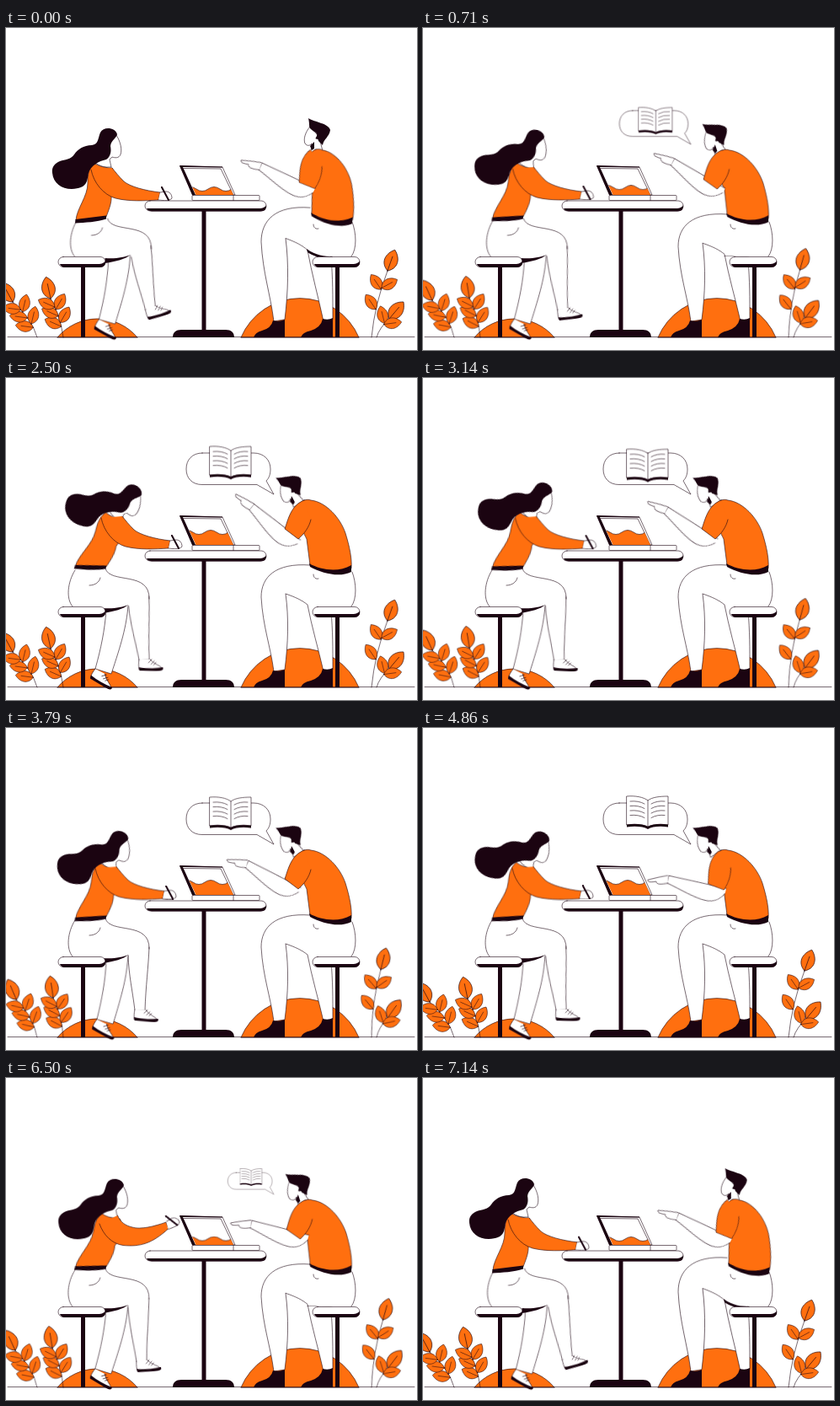
Recreate the animation shown at these times as an HTML page. Size 488 by 382 pixels, loop 7.21 s.

```html
<!DOCTYPE html>
<html lang="en">
<head>
<meta charset="utf-8">
<title>Two people talking at a table</title>
<style>
html, body { margin: 0; width: 100%; height: 100%; overflow: hidden; background: #fff; }
svg { display: block; width: 488px; height: 382px; --dark: #1b0411; --orange: #ff6f0f; }
path, rect { stroke: var(--dark); stroke-width: .6; fill: #fff; stroke-linejoin: round; stroke-linecap: round; }
.dark { fill: var(--dark); stroke: none; }
.orange { fill: var(--orange); }
.line { fill: none; }

/* Every moving part turns about its own joint, set as transform-origin */
.move { animation: 7.21s ease-in-out infinite; }
.sway { animation: sway 1201.667ms ease-in-out infinite alternate; }
@keyframes sway { to { transform: rotate(var(--turn)); } }
#book { animation: float 1201.667ms -1601.667ms ease-in-out infinite alternate; }
@keyframes float { from { transform: translateY(2.5px); } to { transform: translateY(-2.5px); } }
#bubble { animation-name: bubble; transform-origin: 318px 138px; }
@keyframes bubble { 0%, 6%, 93%, 100% { transform: scale(0); } 11.5%, 87.5% { transform: none; } }
#wave { animation-name: wave; }
@keyframes wave {
  0%, 100% { transform: translateY(4px); }
  20.8% { transform: none; }
  34.7%, 67.4% { transform: translate(-4px, -4px); }
  80.3% { transform: translateY(3px); }
}

/* woman */
#w-head { animation-name: w-head; transform-origin: 118px 160px; }
@keyframes w-head {
  20.8% { transform: translate(16px, 2px) rotate(18.5deg); }
  34.7% { transform: translate(15.5px, 3px) rotate(26deg); }
  52.6% { transform: translate(7px, 2px) rotate(11deg); }
  67.4% { transform: translate(7.5px, 1px) rotate(19.5deg); }
  80.3% { transform: translate(15px, 1.5px) rotate(1.5deg); }
}
#w-torso { animation-name: w-torso; transform-origin: 119px 224px; }
@keyframes w-torso {
  20.8%, 34.7% { transform: rotate(8deg) skewX(-5deg); }
  52.6%, 67.4% { transform: rotate(3.5deg) skewX(-2.5deg); }
  80.3% { transform: rotate(12deg) skewX(-7deg); }
}
#w-arm { animation-name: w-arm; }
@keyframes w-arm {
  20.8%, 34.7%, 80.3% { transform: translate(12px, -2px); }
  52.6%, 67.4% { transform: translate(5px, -1.5px); }
}
#w-sleeve { animation-name: w-sleeve; }
@keyframes w-sleeve {
  0%, 67.4%, 100% { d: path("M101 168C104 184 116 198 130 202C146 206 165 205 181 204L183 195C165 193 147 188 140 182C134 176 130 171 126 166"); }
  80.3% { d: path("M109 180C116 192 124 197 136 197C160 197 170 190 193 155L185 149C175 161 160 174 148 174C138 176 130 174 127 162"); }
}
#w-hand { animation-name: w-hand; transform-origin: 182px 199.5px; }
@keyframes w-hand {
  0%, 67.4% { transform: none; }
  80.3% { transform: translate(7px, -47.5px) rotate(-48deg); }
}
#w-hips { animation-name: w-hips; }
@keyframes w-hips {
  0%, 100% { transform: translateX(2.5px); }
  20.8%, 67.4% { transform: none; }
  80.3% { transform: translateX(-3px); }
}
#w-far-shin { animation-name: w-far-shin; transform-origin: 158px 262px; }
@keyframes w-far-shin {
  0%, 100% { transform: rotate(-8deg); }
  20.8%, 52.6% { transform: none; }
  34.7%, 67.4% { transform: rotate(-4deg); }
  80.3% { transform: translateY(4px) rotate(4.5deg); }
}
#w-far-foot { animation-name: w-far-foot; transform-origin: 153px 334px; }
@keyframes w-far-foot { 0%, 100% { transform: rotate(-13deg); } 20.8%, 80% { transform: none; } }
#w-near-shin { animation-name: w-near-shin; transform-origin: 133px 272px; }
@keyframes w-near-shin {
  0%, 52.6%, 67.4%, 100% { transform: rotate(-1.5deg); }
  20.8%, 34.7% { transform: none; }
  80.3% { transform: rotate(1.5deg); }
}

/* man */
#m-head { animation-name: m-head; transform-origin: 370px 142px; }
@keyframes m-head {
  13%, 21%, 80%, 87% { transform: translate(-19.5px, 2px) rotate(-20.5deg); }
  34.7%, 67.4% { transform: translate(-24px, 2.5px) rotate(-27deg); }
}
#m-torso { animation-name: m-torso; transform-origin: 361px 222px; }
@keyframes m-torso { 0%, 100% { transform: translate(2px, -1px) rotate(4deg) skewX(-4.5deg); } 13%, 87% { transform: none; } }
#m-sleeve { animation-name: m-sleeve; transform-origin: 356px 155px; }
@keyframes m-sleeve {
  0%, 100% { transform: translate(10px, -1.5px) rotate(-15deg); }
  13%, 52.6%, 80.3%, 87% { transform: none; }
  67.4% { transform: rotate(-16deg); }
}
#m-forearm { animation-name: m-forearm; }
@keyframes m-forearm {
  0%, 100% { transform: translate(352px, 189px) rotate(26.5deg); }
  20.8% { transform: translate(334px, 187px) rotate(38deg); }
  34.7% { transform: translate(335px, 188px) rotate(39deg); }
  52.6% { transform: translate(335px, 188px) rotate(28.5deg); }
  67.4% { transform: translate(345px, 193px) rotate(14deg); }
  80.3% { transform: translate(337px, 188px) rotate(5deg); }
}
#m-hand { animation-name: m-hand; transform-origin: -56px 0; }
@keyframes m-hand {
  0%, 100% { transform: rotate(-9deg); }
  20.8% { transform: rotate(-5deg); }
  34.7% { transform: none; }
  52.6%, 80.3% { transform: rotate(-16deg); }
}
#m-legs { animation-name: m-legs; transform-origin: 0 348px; }
@keyframes m-legs { 0%, 100% { transform: scaleY(1.07); } 13%, 87% { transform: none; } }
#m-under { animation-name: m-under; transform-origin: 0 271px; }
@keyframes m-under { 13%, 87% { transform: scaleY(0); } }
</style>
</head>
<body>
<svg viewBox="0 0 488 382">
  <defs>
    <g id="leaf">
      <path class="orange" d="M0 0C-11 -6 -9 -18 0 -25C9 -18 11 -6 0 0Z"/>
      <path class="line" d="M0 0V-17"/>
    </g>
    <g id="foot">
      <path d="M0 0C-1 5 -1 8 0 12L27 12C27 8 18 7 13 0"/>
      <path class="dark" d="M-1 9C8 11 18 11 28 10C29 14 26 14 20 14L0 13Z"/>
      <path class="line" d="M11 4L15 0M14 6L18 2M17 7L20 4"/>
    </g>
    <g id="stool">
      <path class="dark" d="M89 280H94V367H89Z"/>
      <rect x="62" y="271.5" width="56" height="12" rx="6"/>
      <path class="dark" d="M64 280H111Q117 279 118 276Q119 284 111 284H69Q65 283 64 280Z"/>
    </g>
    <clipPath id="screen"><path d="M210.500 166H255L270 198H225.500Z"/></clipPath>
  </defs>

  <path class="orange" d="M61 367A62 62 0 0 1 156 367Z"/>
  <path class="orange" d="M279 367A76 76 0 0 1 419 367Z"/>
  <g id="plants"></g>
  <path class="dark" d="M232.500 216H237.500V358H232.500ZM198 367C198 361 202 358 208 358H261C267 358 271 361 271 367Z"/>
  <path d="M2 366.500H485"/>

  <g id="w-hips" class="move">
    <g id="w-far-shin" class="move">
      <path d="M170 260C169 285 166 305 165 335H153C150 310 146 295 145 270"/>
      <g id="w-far-foot" class="move"><use href="#foot" transform="translate(153 334) rotate(2)"/></g>
    </g>
    <g id="w-near-shin" class="move">
      <path d="M145 270C143 295 137 315 125 351L106 345C113 320 117 300 119 276"/>
      <use href="#foot" transform="translate(106 345) rotate(28)"/>
    </g>
    <path class="line" d="M118 226C123 245 171 228 170 262M82 228C73 242 71 262 79 271"/>
    <path class="dark" d="M115 273C128 274 138 272 145 269C140 274 128 277 115 279Z"/>
    <path class="line" d="M99 246C106 246 111 242 112 237"/>
  </g>

  <g id="m-legs" class="move">
    <path d="M332 256C344 260 352 264 358 269C363 295 371 322 377 348L388 346C388 320 388 300 386 276"/>
    <path d="M361 222C320 219 303 236 303 260C305 295 314 318 318 348L331 346C335 315 336 285 332 256"/>
  </g>
  <path id="m-under" class="dark move" d="M357 262C368 270 378 271 388 271L386 275C374 274 364 270 358 266Z"/>
  <path class="line" d="M411 230C416 243 417 262 410 271M365 233C365 237 368 239 371 238"/>
  <path class="dark" d="M317 347Q324 349 331 346V367H294Q296 361 304 359Q315 356 317 347ZM376 345Q383 347 388 344V367H350Q352 361 362 359Q374 355 376 345Z"/>
  <use href="#stool"/>
  <use href="#stool" x="302"/>

  <rect x="165" y="205" width="144" height="12" rx="6"/>
  <path class="dark" d="M167 214H302Q308 213 309 210Q310 217.500 302 217.500H173Q168 217 167 214Z"/>
  <path d="M207 164L257 165L272 198H222Z"/>
  <path class="dark" d="M206 163L257 164.500V165.500L210 165L225 198H221Z"/>
  <path class="line" d="M211 166.500L255 167L270 198"/>
  <g clip-path="url(#screen)">
    <path id="wave" class="orange move" d="M184 187q7 -5 14 0t14 0t14 0t14 0t14 0t14 0t14 0V215H184Z"/>
  </g>
  <rect x="221" y="198.500" width="80" height="6" rx="1"/>
  <path class="line" d="M270 198.500V204.500"/>

  <g id="w-torso" class="move">
    <path class="orange" d="M104 160C98 166 97 174 97 184C97 200 84 214 83 228L119 224C121 218 126 208 125 198C130 190 131 176 126 166C118 166 110 164 104 160Z"/>
    <path class="dark" d="M82.500 227L119 222.500V226.500C108 230 94 231 82 231.500Z"/>
  </g>
  <g id="w-head" class="move">
    <path d="M120 140L131 127C136 135 138 144 136 150C134 155 129 154 126 153L123 156L125 165Q114 166 106 160Z"/>
    <path class="dark" d="M132 126C130 118 116 116 112 124C109 131 110 138 102 139C92 139 85 144 81 150C77 156 70 156 64 158C57 161 54 166 55 172C56 184 66 191 78 191C97 190 96 182 98 172C101 163 110 158 119 156C125 152 125 145 124 140C125 133 131 131 132 126Z"/>
  </g>
  <g id="w-arm" class="move">
    <path id="w-sleeve" class="orange move"/>
    <g id="w-hand" class="move">
      <path d="M181 204C188 205 195 205 197 202C197 197 194 194 190 194L183 195"/>
      <path class="line" style="stroke-width:2" d="M185 189L193 204"/>
    </g>
  </g>

  <g id="m-head" class="move">
    <path d="M361 117C355 124 353 132 355 137C358 141 362 139 363 137L362 148L376 146L372 130Z"/>
    <path class="dark" d="M361 140L366 135V143L363 145ZM359 107C361 116 359 117 362 120C366 124 372 124 368 130C366 133 371 130 371 134L376 139C377 132 384 129 385 121C383 113 367 112 359 107Z"/>
  </g>
  <g id="m-torso" class="move">
    <path class="orange" d="M354 145C340 152 350 178 357 191L361 222C374 229 393 235 410 226C411 215 408 200 403 184C397 166 380 147 362 145C360 144 357 144 354 145Z"/>
    <path class="dark" d="M360 220C374 228 395 231 410 222V230C396 237 376 232 361 224Z"/>
  </g>
  <g id="m-forearm" class="move">
    <path d="M14 -6C-8 -6 -30 -5 -56 -4.500V4.500C-38 8 -20 14 -6 13.500C4 13 10 8 14 0"/>
    <path id="m-hand" class="move" d="M-56 -4.500L-66 -3L-80 0C-80 3 -75 3 -70 2C-70 6 -64 6 -56 4.500"/>
  </g>
  <path id="m-sleeve" class="orange move" d="M354 145C338 151 335 168 331 179L347 191C354 185 360 177 362 168"/>

  <g id="bubble" class="move">
    <path d="M233 89H294C306 89 314 97 314 108C314 115 312 119 309 122L318 138L298 126.500H233C221 126.500 214 119 214 108C214 97 221 89 233 89Z"/>
    <g id="book">
      <path d="M242 82C252 81 262 83 267 87C272 83 281 82 291 82V116C281 115 272 116 267 118C262 116 252 115 242 116Z"/>
      <path class="dark" d="M242 115.500C252 114 262 115 267 118C272 115 281 114 291 115.500V118.500C281 117 272 118 267 121C262 118 252 117 242 118.500Z"/>
      <path class="line" d="M267 87V118"/>
      <g id="print"></g>
    </g>
  </g>
</svg>
<script>
const line = (d) => `<path class="line" d="${d}"/>`;

// Fractions up the stem; a negative one grows its leaf on the left
const bushy = [-.28, .38, -.55, .72, -.78];
const plants = [
  { base: [37, 367], tip: [8, 325], turn: 6, leaves: bushy },
  { base: [68, 367], tip: [53, 321], turn: 4, leaves: bushy },
  { base: [434, 367], tip: [453, 288], turn: -6, leaves: [-.42, -.72, .74] },
  { base: [440, 367], tip: [455, 345], turn: -5, leaves: [-.75, .7] }
];

function drawPlant({ base: [x, y], tip: [tx, ty], turn, leaves }) {
  const bend = [x + (tx - x) * .2, (y + ty) / 2];
  const along = (a, b, c, k) => (1 - k) ** 2 * a + 2 * k * (1 - k) * b + k * k * c;
  const leaf = (k, spread, size) => {
    const px = along(x, bend[0], tx, k), py = along(y, bend[1], ty, k);
    const lean = Math.atan2(tx - x, y - ty) * 180 / Math.PI;
    return `<use href="#leaf" transform="translate(${px} ${py}) rotate(${lean + spread}) scale(${size})"/>`;
  };
  return `<g class="sway" style="--turn:${turn}deg;transform-origin:${x}px ${y}px">` +
    line(`M${x} ${y}Q${bend} ${tx} ${ty}`) + leaf(1, 6, 1.05) +
    leaves.map(k => leaf(Math.abs(k), 48 * Math.sign(k), .85)).join('') + '</g>';
}
document.getElementById('plants').innerHTML = plants.map(drawPlant).join('');

document.getElementById('print').innerHTML = Array.from({ length: 4 }, (_, i) => 88 + i * 5.5).map(y =>
  line(`M246 ${y}Q256 ${y - 1} 263 ${y + 3}M271 ${y + 3}Q278 ${y - 1} 287 ${y}`)).join('');
</script>
</body>
</html>
```
